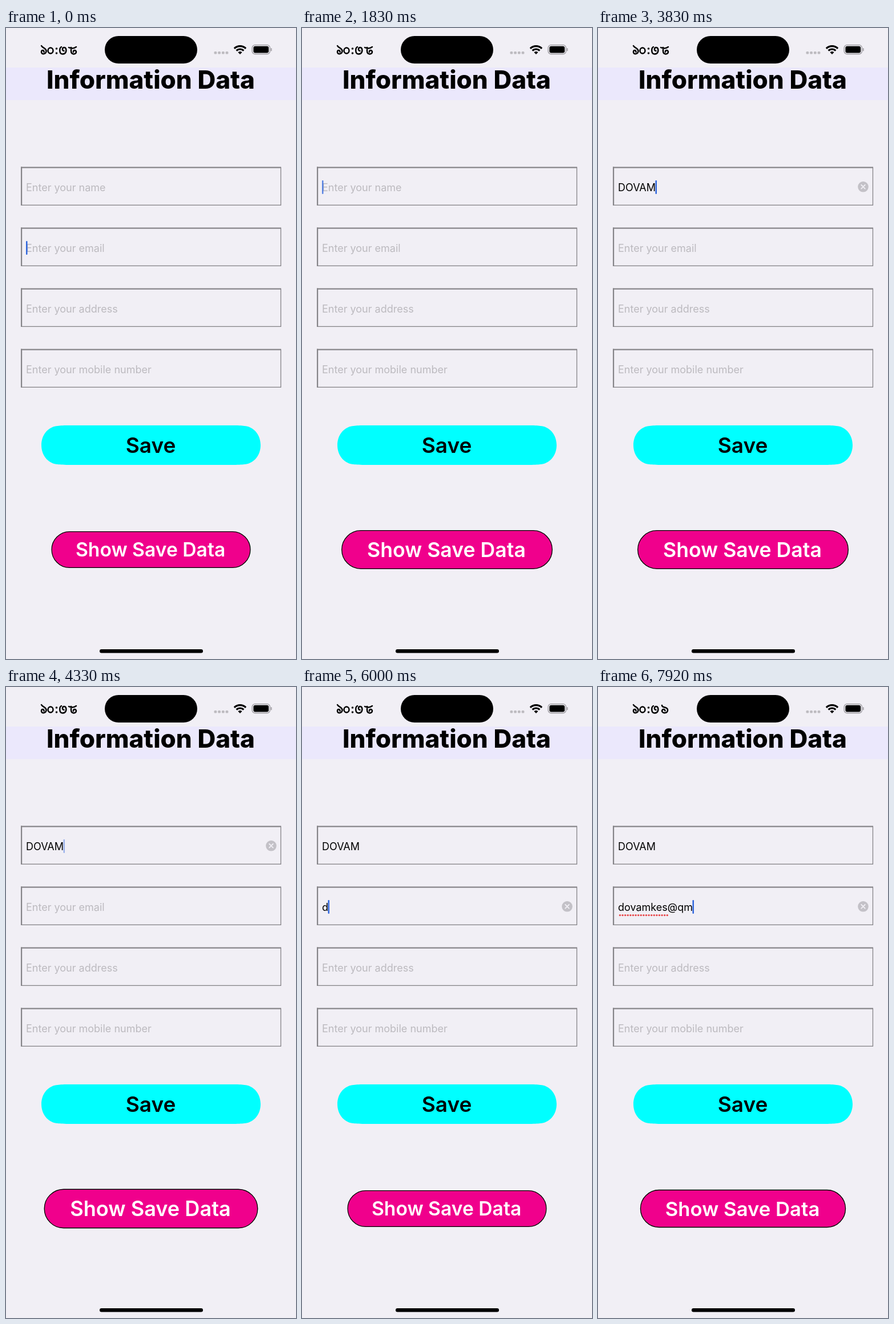
Write an HTML page with a canvas that moves like this. It is 508x1102 px and loops after 8000 ms.

```html
<!DOCTYPE html>
<html lang="en">
<head>
<meta charset="utf-8">
<title>Information form</title>
<style>
  html, body { margin: 0; width: 100%; height: 100%; overflow: hidden; background: #f1eff5; }
  canvas { display: block; width: 508px; height: 1102px; }
</style>
</head>
<body>
<canvas id="stage"></canvas>
<script>
const W = 508, H = 1102, LOOP = 8000, FPS = 12;
const BG = '#f1eff5', GRAY = '#bcbabf', FONT = 'Inter, "Open Sans", sans-serif';
const canvas = document.getElementById('stage');
const ratio = window.devicePixelRatio || 1;
canvas.width = W * ratio;
canvas.height = H * ratio;
const ctx = canvas.getContext('2d');
ctx.scale(ratio, ratio);

const PLACEHOLDERS = ['name', 'email', 'address', 'mobile number'].map(s => 'Enter your ' + s);
const FIELD_TOP = 243, FIELD_STEP = 106, TEXT_X = 35;

// [time, focused field, its text]
const INPUT = [
  [0, 1, ''], [1300, 0, ''],
  [2200, 0, 'D'], [2600, 0, 'DV'], [2750, 0, 'DVA'], [3000, 0, 'DV'], [3150, 0, 'D'],
  [3300, 0, 'DO'], [3500, 0, 'DOV'], [3600, 0, 'DOVA'], [3750, 0, 'DOVAM'],
  [4600, 1, ''],
  [5980, 1, 'd'], [6160, 1, 'do'], [6320, 1, 'dov'], [6490, 1, 'dova'], [6750, 1, 'dovam'],
  [6910, 1, 'dovamk'], [7080, 1, 'dovamke'], [7250, 1, 'dovamkes'],
  [7580, 1, 'dovamkes@'], [7750, 1, 'dovamkes@q'], [7910, 1, 'dovamkes@qm']
];

const CLOCK = {
  hour: new Path2D('M62 31 C64 35 70 35 70.5 40 C70.5 46 62 47 62 42 C62 38 67 38 66.5 42'),
  zero: new Path2D('M82.5 39.5 a4.5 5 0 1 0 -9 0 a4.5 5 0 1 0 9 0'),
  three: new Path2D('M97 33 C93 35 93 45.5 99 45.5 C107 45.5 107 34 102 34 C98 34 98 40 101.5 40'),
  eight: new Path2D('M110 34 C114 36 119 36 123 33 M114 34 V40 C114 47 123 47 123 41.5 C122 37.5 117.5 38.5 118 42'),
  nine: new Path2D('M112 32 C112 37 121 34 122 39.5 C123 46 113 47 112 42 C112.5 38 117 38 117.5 41.5')
};

function rounded(x, y, w, h, r, color) {
  ctx.beginPath();
  ctx.roundRect(x, y, w, h, r);
  ctx.fillStyle = color;
  ctx.fill();
}

function dot(x, y, r, color) {
  ctx.beginPath();
  ctx.arc(x, y, r, 0, 7);
  ctx.fillStyle = color;
  ctx.fill();
}

function label(text, x, y, size, weight, color, align = 'center') {
  ctx.font = `${weight} ${size}px ${FONT}`;
  ctx.textAlign = align;
  ctx.fillStyle = color;
  ctx.fillText(text, x, y);
}

function drawClock(late) {
  ctx.strokeStyle = '#000';
  ctx.lineWidth = 2.5;
  ctx.lineCap = ctx.lineJoin = 'round';
  for (const key of ['hour', 'zero', 'three', late ? 'nine' : 'eight']) ctx.stroke(CLOCK[key]);
  dot(88.5, 36, 1.8, '#000');
  dot(88.5, 44, 1.8, '#000');
}

function drawStatus(late) {
  drawClock(late);
  rounded(173, 14, 162, 48, 24, '#000');
  for (let i = 0; i < 4; i++) rounded(364.5 + i * 6.7, 41, 4.8, 4.6, 1.5, '#bdbbc0');

  ctx.lineCap = 'butt';
  ctx.lineWidth = 3.2;
  for (const r of [14.3, 9]) {
    ctx.beginPath();
    ctx.arc(410, 46, r, -Math.PI * 0.75, -Math.PI * 0.25);
    ctx.stroke();
  }
  ctx.beginPath();
  ctx.moveTo(410, 46);
  ctx.arc(410, 46, 5, -Math.PI * 0.75, -Math.PI * 0.25);
  ctx.fillStyle = '#000';
  ctx.fill();

  ctx.beginPath();
  ctx.roundRect(431.2, 29.7, 31.2, 15.8, 5);
  ctx.strokeStyle = '#98969b';
  ctx.lineWidth = 1.3;
  ctx.stroke();
  rounded(433.4, 31.8, 26.8, 11.6, 3.2, '#000');
  rounded(463.7, 35, 2, 5.4, 1, '#a5a3a8');
}

function drawClear(y) {
  dot(464.5, y, 9.3, '#c3c1c7');
  ctx.strokeStyle = BG;
  ctx.lineWidth = 1.8;
  ctx.lineCap = 'round';
  ctx.beginPath();
  for (const s of [-1, 1]) {
    ctx.moveTo(461.2, y - 3.3 * s);
    ctx.lineTo(467.8, y + 3.3 * s);
  }
  ctx.stroke();
}

function caretAlpha(ms) {
  const u = ms % 1000;
  if (u < 500) return 1;
  if (u < 650) return (650 - u) / 150;
  return Math.max(0, (u - 850) / 150);
}

function drawField(i, text, focused, idle) {
  const y = FIELD_TOP + i * FIELD_STEP;
  ctx.fillStyle = '#858488';
  ctx.fillRect(26, y - 0.5, 456, 2.2);
  ctx.fillRect(26, y - 0.5, 2.2, 67.5);
  ctx.fillRect(480.8, y, 1.3, 67);
  ctx.fillRect(26, y + 65.7, 456, 1.3);

  label(text || PLACEHOLDERS[i], TEXT_X, y + 41.6, 18, 400, text ? '#000' : GRAY, 'left');
  if (!focused) return;

  const at = text.indexOf('@');
  if (at > 0) {
    const end = TEXT_X + ctx.measureText(text.slice(0, at)).width;
    for (let x = 38.5; x < end; x += 4.6) dot(x, y + 149.6 - 100, 1.7, '#e8484a');
  }
  if (text) drawClear(y + 34.3);
  ctx.font = `400 18px ${FONT}`;
  const x = TEXT_X + (text ? ctx.measureText(text).width - 0.5 : 0);
  ctx.globalAlpha = caretAlpha(idle);
  rounded(x, y + 23, 2.5, 24, 1.2, '#2f66dd');
  ctx.globalAlpha = 1;
}

function drawSave() {
  ctx.beginPath();
  ctx.moveTo(110, 694);
  ctx.lineTo(398, 694);
  ctx.bezierCurveTo(410, 694, 414, 694.5, 420, 695.2);
  ctx.bezierCurveTo(435, 697.5, 446, 711, 446, 728.5);
  ctx.bezierCurveTo(446, 746, 435, 759.5, 420, 761.8);
  ctx.bezierCurveTo(414, 762.5, 410, 763, 398, 763);
  ctx.lineTo(110, 763);
  ctx.bezierCurveTo(98, 763, 94, 762.5, 88, 761.8);
  ctx.bezierCurveTo(73, 759.5, 62, 746, 62, 728.5);
  ctx.bezierCurveTo(62, 711, 73, 697.5, 88, 695.2);
  ctx.bezierCurveTo(94, 694.5, 98, 694, 110, 694);
  ctx.fillStyle = '#00ffff';
  ctx.fill();
  label('Save', 253.5, 742, 37, 600, '#000');
}

// Critically damped spring from 0.9 to 1, played forwards and backwards.
function pulse(ms) {
  const u = (ms - 52 + LOOP) % 2000;
  const y = Math.min(u, 2000 - u) * 0.00984;
  return 1 - 0.1 * (1 + y) * Math.exp(-y);
}

function drawShow(scale) {
  ctx.save();
  ctx.translate(254, 911);
  ctx.scale(scale, scale);
  rounded(-191.3, -34.6, 382.6, 69.2, 34.6, '#f0008c');
  ctx.strokeStyle = '#000';
  ctx.lineWidth = 1.4;
  ctx.stroke();
  label('Show Save Data', -1, 13.5, 37, 600, '#fff');
  ctx.restore();
}

function draw(ms) {
  ctx.fillStyle = BG;
  ctx.fillRect(0, 0, W, H);
  ctx.fillStyle = '#ebe8fc';
  ctx.fillRect(0, 69, W, 57);

  const texts = ['', '', '', ''];
  let focus = 0, changed = 0;
  for (const [start, field, text] of INPUT) {
    if (start > ms) break;
    texts[field] = text;
    focus = field;
    changed = start;
  }

  label('Information Data', 253.5, 106, 44, 800, '#000');
  drawStatus(ms >= 7660);
  texts.forEach((text, i) => drawField(i, text, i === focus, ms - changed));
  drawSave();
  drawShow(pulse(ms));
  rounded(164, 1085, 181, 6.4, 3.2, '#000');
}

function tick() {
  const t = performance.now() % LOOP;
  const step = Math.min(LOOP * FPS / 1000 - 1, Math.floor((t + 5) * FPS / 1000));
  draw(step * 1000 / FPS);
  requestAnimationFrame(tick);
}
tick();
</script>
</body>
</html>
```
